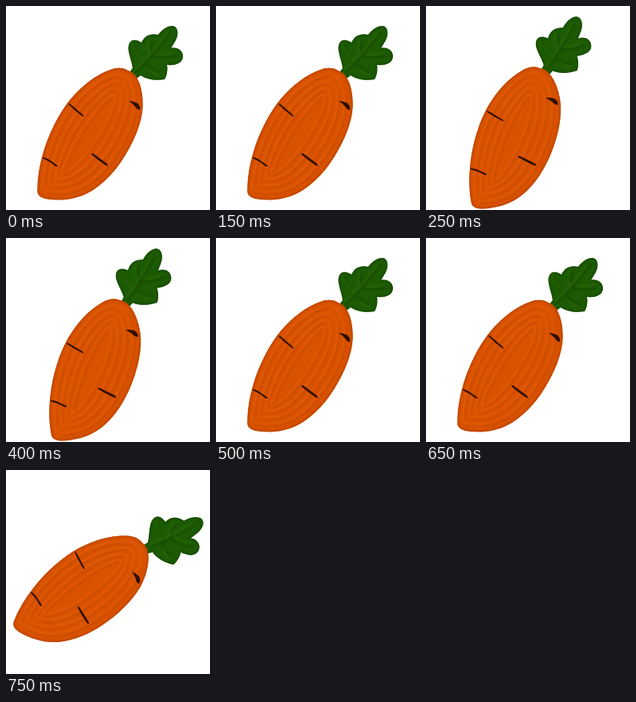
Write an HTML page that moves like this. It is 256 px wide and 256 px high and loops after 1000 ms.

```html
<!DOCTYPE html>
<html lang="en">
<head>
<meta charset="utf-8">
<title>Wobbling carrot</title>
<style>
  html, body { margin: 0; width: 100%; height: 100%; overflow: hidden; background: #fff; }
  svg { display: block; width: 100%; height: 100%; }
  .line { fill: none; stroke-linecap: round; stroke-linejoin: round; }
  #ridges use { vector-effect: non-scaling-stroke; }
</style>
</head>
<body>
<svg viewBox="0 0 256 256">
  <defs>
    <path id="body" vector-effect="non-scaling-stroke" d="M153 81C147 77 139 77 131 80C114 86 96 99 81 117C66 135 54 160 47 183C42 200 39 217 39.500 234Q41 240 50 242C68 245 86 243 102 235C118 227 133 212 144 196C157 177 168 154 171 133C173 117 170 99 164 90Q160 83 153 81Z"/>
    <path id="leaf" d="M153 86L159 78C158 70 155 64 154 57C152 46 158 38 170 46C174 37 181 34 191 36C197 28 204 25 209 25C216 26 217 35 213 43L207 53C215 51 222 56 222 63C222 71 214 75 202 74C203 80 202 87 199 92C188 94 176 92 169 87L161 93Z"/>
    <clipPath id="bodyClip"><use href="#body"/></clipPath>
    <clipPath id="leafClip"><use href="#leaf"/></clipPath>
    <filter id="soft"><feGaussianBlur stdDeviation="0.9"/></filter>
  </defs>
  <g id="carrot">
    <use href="#leaf" fill="#1d5a04"/>
    <g clip-path="url(#leafClip)">
      <g class="line" filter="url(#soft)">
        <use href="#leaf" stroke="#184c03" stroke-width="3"/>
        <path stroke="#184803" stroke-width="2" d="M164 82Q183 66 207 33M178 70Q167 60 161 49M183 64Q180 51 184 43M186 63Q200 66 213 62M177 74Q187 82 194 83"/>
        <path stroke="#2a6a0c" stroke-width="1.5" d="M161 80Q181 62 203 33M174 67Q163 57 158 47M180 61Q176 48 181 41M188 60Q201 62 211 58M179 78Q187 87 192 86"/>
      </g>
    </g>
    <use href="#body" fill="#d85200"/>
    <g clip-path="url(#bodyClip)">
      <g id="ridges" class="line" filter="url(#soft)">
        <use href="#body" stroke="#c04700" stroke-width="4"/>
      </g>
    </g>
    <g fill="#301003">
      <path d="M78 122Q80 122 83 125L97 137Q98 139 96 138.500Q87 132 79 124Z"/>
      <path d="M154 119Q159 119 165 122Q169 126 168 130Q165 131 161 125Q157 121 154 119Z"/>
      <path d="M107 185Q109 184 112 187L127 198Q129 201 126 200.500Q116 194 108 187Z"/>
      <path d="M46 189.500Q50 190 56 194L65 200.500Q65 202 62 201Q55 195 46 191Z"/>
    </g>
  </g>
</svg>
<script>
const carrot = document.getElementById('carrot');
const ridges = document.getElementById('ridges');

// A ring set in by the same distance all round the long body.
function addRidge(inset, shift, colour) {
  const ring = document.createElementNS('http://www.w3.org/2000/svg', 'use');
  ring.setAttribute('href', '#body');
  ring.setAttribute('transform',
    `translate(${106 + shift} ${161 + shift}) rotate(-57) ` +
    `scale(${1 - inset / 92} ${1 - inset / 46}) rotate(57) translate(-106 -161)`);
  ring.setAttribute('stroke', colour);
  ring.setAttribute('stroke-width', 2);
  ridges.append(ring);
}
for (let inset = 9; inset < 45; inset += 9) {
  addRidge(inset, 1, '#c64a00');
  addRidge(inset, -1, '#e65c08');
}

// Each pose is [x shift, y shift, angle] about the carrot's middle.
const rest = [0, 0, 0];
const poses = [rest, [4, 4, -10], rest, [-8, -12.5, 21.7]];

function draw() {
  const [x, y, angle] = poses[Math.floor(performance.now() / 250) % 4];
  carrot.setAttribute('transform', `translate(${x} ${y}) rotate(${angle} 106 161)`);
  requestAnimationFrame(draw);
}
draw();
</script>
</body>
</html>
```
